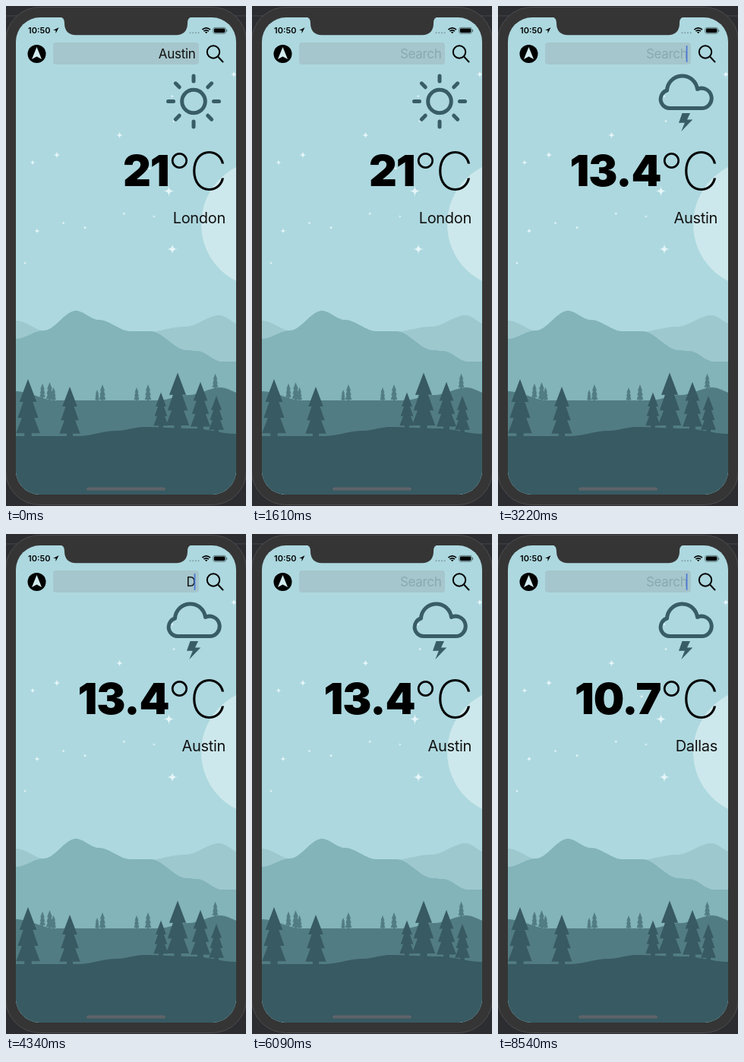
Write an HTML page that moves like this. It is 316 px wide and 658 px high and loops after 8.61 s.

```html
<!DOCTYPE html>
<html lang="en">
<head>
<meta charset="utf-8">
<title>Weather search</title>
<style>
  html, body { margin: 0; width: 100%; height: 100%; overflow: hidden; background: #2b2d31; }
  svg { display: block; width: 100vw; height: 100vh; }
  text { font-family: Inter, Roboto, "Liberation Sans", sans-serif; text-anchor: end; }
  .temp { font-size: 57px; font-weight: 900; letter-spacing: -1px; }
  .unit { font-size: 69px; font-weight: 250; }
  .city { font-size: 20px; letter-spacing: -.3px; fill: #111; }
  .field { font-size: 17px; letter-spacing: -.3px; }
  .clock { font-size: 11px; font-weight: 600; text-anchor: start; }
  .line { fill: none; stroke: #385d66; stroke-width: 5; stroke-linecap: round; stroke-linejoin: round; }
</style>
</head>
<body>
<svg viewBox="0 0 316 658" preserveAspectRatio="none">
  <defs>
    <clipPath id="screen"><rect x="13" y="15" width="290" height="628" rx="32"/></clipPath>
  </defs>
  <path d="M0 13H316" stroke="#44464a"/>
  <rect x="-.5" y="1.5" width="317" height="655" rx="45" fill="#353535" stroke="#4d4d4d"/>

  <g clip-path="url(#screen)">
    <rect x="13" y="15" width="290" height="628" fill="#add8df"/>
    <circle cx="341" cy="287" r="84" fill="#cde8ec"/>
    <g id="stars" fill="#e6f6f8"/>
    <g id="land"/>
    <rect x="106" y="633.5" width="104" height="4" rx="2" fill="#5f6468"/>
    <rect x="62" y="48" width="192" height="29" rx="4" fill="#a0b7bd" fill-opacity=".52"/>
  </g>

  <path fill="#353535" d="M67 14C75 14 77 17 77 23C77 33 83 38.3 92 38.3H224
    C233 38.3 239 33 239 23C239 17 241 14 249 14Z"/>

  <text class="clock" x="29" y="36.3">10:50</text>
  <path d="M69.5 28.2L62 32H65.5V36Z"/>
  <path d="M242.5 35.2H254" stroke="#7f9ea4" stroke-width="2" stroke-linecap="round" stroke-dasharray="0 3.7"/>
  <path d="M258.4 31.2Q263.7 26.6 269 31.2M260.4 33.2Q263.7 30.5 267 33.2"
    fill="none" stroke="#000" stroke-width="1.7"/>
  <path d="M261.9 34.3Q263.7 33 265.5 34.3L263.7 36.3Z"/>
  <rect x="272.6" y="28.4" width="17" height="8" rx="2.4" fill="none" stroke="#537177" stroke-width=".8"/>
  <rect x="273.8" y="29.6" width="14.6" height="5.6" rx="1.4"/>
  <path d="M290.7 31V34" stroke="#537177"/>

  <circle cx="40.5" cy="63" r="12"/>
  <path fill="#d3eaee" d="M40.5 54L47 70L40.5 66.5L34 70Z"/>
  <g fill="none" stroke="#000" stroke-width="2" stroke-linecap="round">
    <circle cx="273" cy="60.5" r="8.2"/><path d="M279 66.5L285.5 73.5"/>
  </g>

  <text class="field" id="field" x="249.5" y="69"/>
  <rect id="caret" x="247.7" y="52" width="1.7" height="22" rx=".8" fill="#4a75d6"/>

  <g id="sun" class="line"><circle cx="247" cy="125.5" r="15.3"/></g>
  <g id="storm">
    <path class="line" d="M225.5 134.6A12.1 12.1 0 0 1 222.5 111A20.1 20.1 0 0 1 262.5 109.4
      A13.2 13.2 0 1 1 267.8 134.6Z"/>
    <path fill="#385d66" d="M242.5 141H253L249 149.5H256.3L241.3 165L245.8 153.7H238Z"/>
  </g>

  <text class="temp" id="temp" x="214.5" y="237"/>
  <text class="unit" x="228.5" y="243" style="text-anchor: middle">°</text>
  <text class="unit" x="291.5" y="242">C</text>
  <text class="city" id="city" x="289" y="286"/>
</svg>
<script>
const LOOP = 8610;
const $ = id => document.getElementById(id);

function addPath(parent, d, fill) {
  const path = document.createElementNS('http://www.w3.org/2000/svg', 'path');
  path.setAttribute('d', d);
  if (fill) path.setAttribute('fill', fill);
  parent.appendChild(path);
}

function star(x, y, r) {
  const tips = [[x + r, y], [x, y + r], [x - r, y], [x, y - r]];
  addPath($('stars'), `M${x} ${y - r}` + tips.map(([tx, ty]) => `Q${x} ${y} ${tx} ${ty}`).join(''));
}

// Height of a hill line that eases from one level to the next.
function heightAt(levels, x) {
  const next = Math.max(1, levels.findIndex(p => p[0] >= x));
  const [x0, y0] = levels[next - 1], [x1, y1] = levels[next];
  const u = (x - x0) / (x1 - x0);
  return y0 + (y1 - y0) * u * u * (3 - 2 * u);
}

// Half outline as [share of width, share of height], mirrored around the trunk.
const outline = [[0, 0], [.36, .4], [.2, .4], [.43, .68], [.26, .68], [.5, .95], [.15, .95], [.15, 1.04]];
function treePath(x, base, height) {
  const side = sign => outline.map(([w, h]) => `${x + sign * w * height * .42} ${base - height * (1 - h)}`);
  return 'M' + [...side(1), ...side(-1).reverse()].join('L') + 'Z';
}

function hill(color, levels, trees = []) {
  let d = 'M13 643';
  for (let x = 13; x <= 303; x += 2) d += `L${x} ${heightAt(levels, x)}`;
  addPath($('land'), d + 'V643Z', color);
  for (const [x, height] of trees) addPath($('land'), treePath(x, heightAt(levels, x), height), color);
}

hill('#9dc8ce', [[13, 414], [55, 429], [180, 430], [236, 422], [281, 407], [310, 420]]);
hill('#82b4ba', [[13, 438], [50, 427], [92, 401], [122, 413], [164, 428], [190, 428], [238, 453],
  [252, 454], [284, 468], [303, 468]]);
hill('#527c83', [[13, 507], [66, 519], [200, 519], [240, 512], [283, 502], [310, 510]],
  [[48, 19], [57.5, 23], [62.5, 17], [120, 14], [127, 21], [172, 17], [187, 21], [275.5, 19]]);
hill('#385a62', [[13, 566], [95, 566], [145, 559], [182, 554], [245, 556], [303, 563]],
  [[29, 75], [84, 65], [204, 46], [226, 73], [256, 62], [277, 47]]);

const brightStars = [[67, 196, 5], [35, 206, 4], [149.5, 170, 5], [214.5, 243.5, 7], [219, 320, 7],
  [41, 296, 4], [300, 90, 5]];
brightStars.forEach(s => star(...s));

let seed = 7;
const random = () => (seed = seed * 16807 % 2147483647) / 2147483647;
for (let i = 0; i < 8; i++) star(25 + 240 * random(), 85 + 275 * random(), 2 + random());

for (let i = 0; i < 8; i++) {
  const c = Math.cos(i * Math.PI / 4), s = Math.sin(i * Math.PI / 4);
  addPath($('sun'), `M${247 + 26.5 * c} ${125.5 + 26.5 * s}L${247 + 33.5 * c} ${125.5 + 33.5 * s}`);
}

const reports = [
  { from: 0, city: 'London', temp: '21', icon: 'sun' },
  { from: 1890, city: 'Austin', temp: '13.4', icon: 'storm' },
  { from: 6650, city: 'Dallas', temp: '10.7', icon: 'storm' }
];
const typing = { start: 4200, perKey: 260, submit: 5950 };

function typedText(t) {
  if (t < 910) return 'Austin';
  if (t < typing.start || t >= typing.submit) return '';
  return 'Dallas'.slice(0, 1 + Math.floor((t - typing.start) / typing.perKey));
}

function render(t) {
  const report = reports.filter(r => t >= r.from).pop();
  $('city').textContent = report.city;
  $('temp').textContent = report.temp;
  for (const id of ['sun', 'storm']) $(id).style.display = id === report.icon ? '' : 'none';

  const typed = typedText(t);
  $('field').textContent = typed || 'Search';
  $('field').setAttribute('fill', typed ? '#111' : '#8aa9af');
  const editing = t >= 2800 && t < typing.submit || t >= 8050;
  $('caret').style.display = editing ? '' : 'none';
}

const start = performance.now();
function tick() {
  render((performance.now() - start) % LOOP);
  requestAnimationFrame(tick);
}
tick();
</script>
</body>
</html>
```
